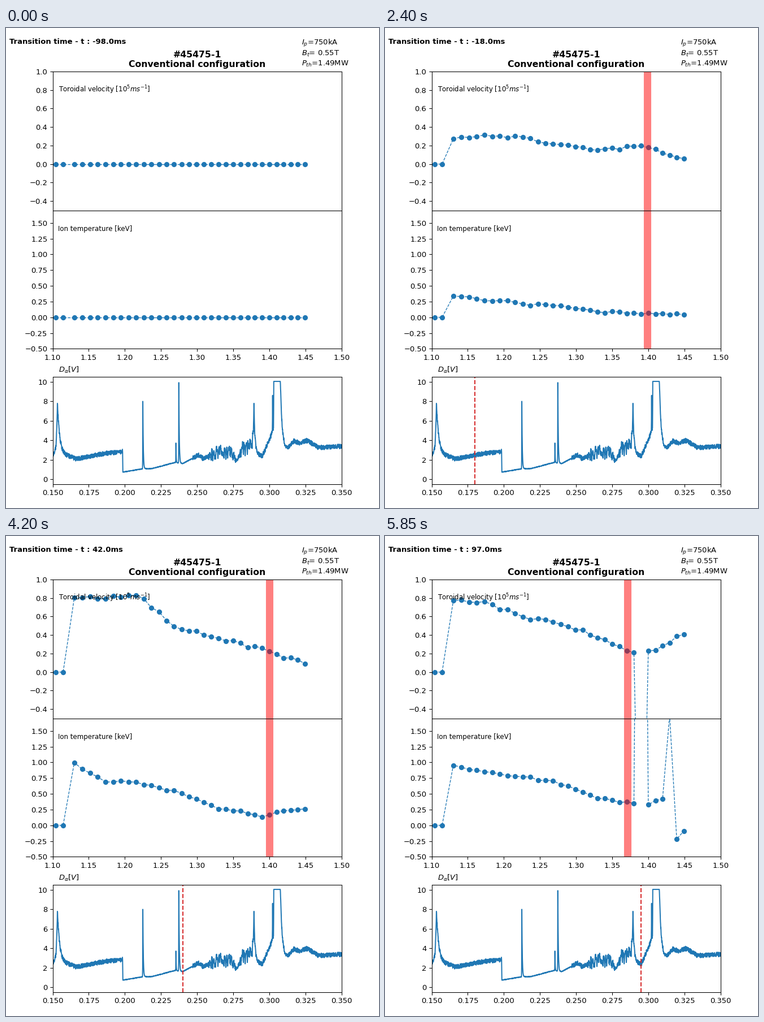
A matplotlib script for the animation above (6 s loop, 660 by 849 pixels).

```python
import numpy as np
import matplotlib.pyplot as plt
from matplotlib.animation import FuncAnimation

W, H = 660, 849
DPI = W / 7
FRAMES, INTERVAL = 40, 150
FIRST_DATA = 13          # step at which the profiles leave zero

# Two dead inner channels, then channels that crowd slightly towards the edge
i = np.arange(32)
RADIUS = np.r_[1.104, 1.1145, 1.130 + 0.01085 * i - 1.82e-5 * i**2]

# Profile shapes: one row per key step, one column per knot radius
KEYS = [16, 25, 32, 39]
KNOTS = [1.13, 1.17, 1.22, 1.27, 1.33, 1.39, 1.449]
VELOCITY = np.array([
    [0.28, 0.31, 0.29, 0.21, 0.15, 0.20, 0.05],
    [0.75, 0.72, 0.72, 0.49, 0.36, 0.23, 0.10],
    [0.87, 0.92, 0.96, 0.49, 0.36, 0.27, 0.08],
    [0.76, 0.77, 0.61, 0.54, 0.38, 0.18, 0.40]])
TEMPERATURE = np.array([
    [0.33, 0.28, 0.23, 0.19, 0.09, 0.07, 0.05],
    [0.95, 0.71, 0.67, 0.53, 0.25, 0.14, 0.18],
    [1.04, 0.69, 0.66, 0.55, 0.30, 0.16, 0.40],
    [0.95, 0.87, 0.78, 0.69, 0.44, 0.32, 0.50]])
# Failed edge fits in the closing step: channel -> value
VELOCITY_MISFITS = {27: -3.5}
TEMPERATURE_MISFITS = {27: 15, 31: 1.75, 32: -0.22, 33: -0.09}

BAND_STEPS = [1, 7, 11, 16, 25, 32, 39]
BAND_RADIUS = [1.3825, 1.3835, 1.3862, 1.398, 1.410, 1.3856, 1.3707]


def profile(k, shape, misfits, seed):
    values = np.zeros(len(RADIUS))
    if k < FIRST_DATA:
        return values
    now = [np.interp(k, KEYS, knot) for knot in shape.T]
    scatter = np.random.default_rng([seed, k]).normal(0, 0.012, len(i))
    values[2:] = np.interp(RADIUS[2:], KNOTS, now) + scatter
    if k == FRAMES - 1:
        for channel, value in misfits.items():
            values[channel] = value
    return values


def peak(t, centre, height, rise, decay):
    dt = t - centre
    return height * np.exp(-np.abs(dt) / np.where(dt < 0, rise, decay))


def emission():
    """D-alpha signal: slow level, sharp peaks, noise bursts and saturation."""
    t = np.linspace(150, 350, 2001)
    level = np.array([
        (150, 2.6), (161, 2.4), (166, 2.1), (186, 2.65), (198.4, 2.85),
        (198.6, 0.75), (212, 1.08), (219, 1.12), (235, 1.75), (240, 1.62),
        (251, 2.5), (254, 2.15), (262, 2.5), (274, 2.5), (277, 1.85), (281, 2.9),
        (288, 2.9), (295, 2.35), (300, 4.1), (302.9, 5.2), (303.5, 3.1),
        (312, 3.1), (317, 3.95), (321, 3.7), (326, 4), (334, 3.25), (350, 3.4)])
    signal = np.interp(t, *level.T)
    for shape in [(153.3, 5.4, 0.6, 1.6), (212.4, 6.9, 0.05, 0.3),
                  (235.3, 2, 0.05, 0.15), (237.3, 8.2, 0.05, 0.3),
                  (289.3, 4.6, 0.6, 0.7), (302.2, 3.5, 0.1, 0.1),
                  (303, 310, 0.02, 1.2)]:
        signal += peak(t, *shape)

    rng = np.random.default_rng(7)
    quiet = (t > 198.4) & (t < 247)
    signal += np.where(quiet, 0.03, 0.24) * rng.uniform(-1, 1, t.size)
    burst = 0.7 * np.exp(-((t - 267) / 9)**6) + np.exp(-((t - 284.5) / 5)**6)
    grid = np.arange(150, 351, 0.3)
    signal += burst * np.interp(t, grid, rng.uniform(-0.7, 1.2, grid.size))
    return t / 1000, np.minimum(signal, 10.04)


plt.rcParams["font.family"] = "DejaVu Sans"
fig = plt.figure(figsize=((W + 0.01) / DPI, (H + 0.01) / DPI), dpi=DPI, facecolor="white")


def panel(top, bottom, xlim, ylim, xticks, yticks):
    ax = fig.add_axes([0.125, 1 - bottom / H, 0.775, (bottom - top) / H])
    ax.set(xlim=xlim, ylim=ylim, xticks=xticks, yticks=yticks)
    return ax


def label(x, y, text, size=10, **style):
    """Text with its baseline at pixel (x, y), counted from the top left."""
    return fig.text(x / W, 1 - y / H, text, fontsize=size, va="baseline", **style)


def profile_line(ax):
    return ax.plot(RADIUS, 0 * RADIUS, "o--", color="C0", lw=1)[0]


ax_v = panel(76.9, 322.6, (1.1, 1.5), (-0.5, 1), [], np.arange(-2, 6) / 5)
ax_t = panel(322.6, 567.4, (1.1, 1.5), (-0.5, 1.7),
             np.arange(22, 31) / 20, np.arange(-2, 7) / 4)
ax_d = panel(616.8, 806.9, (0.15, 0.35), (-0.49, 10.52),
             np.arange(6, 15) / 40, np.arange(0, 11, 2))

ax_v.set_title("#45475-1\nConventional configuration", fontsize=12,
               fontweight="bold", linespacing=1.13)
label(92.5, 112.8, "Toroidal velocity [$10^5ms^{-1}$]", 9)
label(92, 359, "Ion temperature [keV]", 9)
label(92.5, 609.2, r"$D_{\alpha}[V]$")
label(523, 29.6, "$I_p$=750kA")
label(523, 49.2, "$B_t$= 0.55T")
label(523, 67, "$P_{th}$=1.49MW")
clock = label(5.5, 28, "", fontweight="bold")

line_v, line_t = profile_line(ax_v), profile_line(ax_t)
bands = [ax.axvline(1.38, color="red", lw=10, alpha=0.5) for ax in (ax_v, ax_t)]
ax_d.plot(*emission(), color="C0", lw=1.5)
cursor = ax_d.axvline(0.15, color="C3", ls="--", lw=1.5)


def update(k):
    ms = 5 * k - 98
    clock.set_text(f"Transition time - t : {ms:.1f}ms")
    line_v.set_ydata(profile(k, VELOCITY, VELOCITY_MISFITS, 1))
    line_t.set_ydata(profile(k, TEMPERATURE, TEMPERATURE_MISFITS, 2))
    for band in bands:
        band.set_visible(k > 0)
        band.set_xdata([np.interp(k, BAND_STEPS, BAND_RADIUS)] * 2)
    now = (198 + ms) / 1000
    cursor.set_visible(now > 0.151)
    cursor.set_xdata([now, now])
    return [clock, line_v, line_t, cursor, *bands]


anim = FuncAnimation(fig, update, frames=FRAMES, interval=INTERVAL,
                     init_func=lambda: update(0), repeat=True, repeat_delay=0)
plt.show()
```
